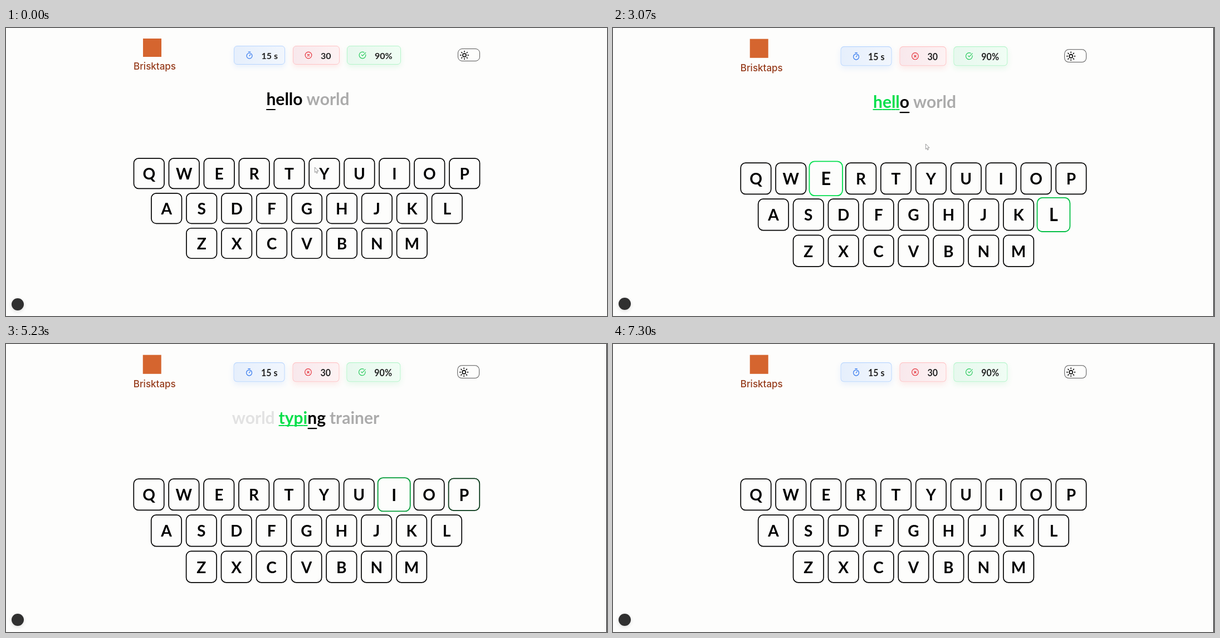
An HTML page that plays this animation: 1079x519 px, repeating every 8 s.

```html
<!DOCTYPE html>
<html lang="en">
<head>
<meta charset="utf-8">
<style>
  html, body { margin: 0; width: 100%; height: 100%; overflow: hidden; background: #fdfdfc; }
  body * { position: absolute; box-sizing: border-box; }
  svg { fill: none; stroke: currentColor; stroke-width: 2; stroke-linecap: round; stroke-linejoin: round; }
  #app { left: 0; top: 0; width: 1079px; height: 440px; transform-origin: 0 0;
         font: 700 16px Lato, sans-serif; font-kerning: none; color: #000; }
  #mark { left: 246px; top: 19px; width: 33px; height: 33px; background: #d5652f; }
  #brand { left: 217px; top: 58px; width: 100px; text-align: center;
           font: 500 17px/22px Inter, sans-serif; color: #963c1c; }
  .badge { top: 31.5px; height: 34px; border: 1px solid; border-radius: 6px; }
  .badge svg { left: 20px; top: 9px; width: 14px; height: 14px; }
  .badge b { left: 49px; top: 0; line-height: 33px; white-space: pre; color: #222; }
  #toggle { left: 811px; top: 37px; width: 40px; height: 22.5px; border: 1px solid #555; border-radius: 8px; }
  #toggle svg { left: 2px; top: 1.5px; width: 18px; height: 18px; }
  #words { left: 0; top: 109px; width: 1077px; display: flex; justify-content: center; gap: 7px;
           font-size: 30px; line-height: 36px; }
  #words * { position: relative; }
  #words i { display: inline-block; font-style: normal; }
  #words .typed { color: #05df4b; }
  #words .typed::after, #words .next::after { content: ""; position: absolute; left: 0; width: 100%;
           top: 31.5px; height: 2px; background: currentColor; }
  #words .next::after { top: 37px; border-radius: 1px; }
  #keyboard { left: 539.5px; top: 233.8px; transform: scale(.562); }
  .key { width: 100px; height: 100px; border: 3px solid #000; border-radius: 17px; background: #fdfdfc;
         font-size: 50px; line-height: 94px; text-align: center; }
  #dot { left: 10px; width: 22px; height: 22px; border-radius: 50%; background: #303030;
         box-shadow: 0 2px 6px #0002; }
  #edge { left: 1078px; top: 0; width: 1px; height: 519px; background: #000; }
  #pointer { left: 0; top: 0; width: 9px; height: 13px; color: #777; stroke-width: .8; fill: #fff; }
</style>
</head>
<body>
<div id="app">
  <div id="mark"></div>
  <div id="brand">Brisktaps</div>
  <div class="badge" style="left:408.5px;width:92.5px;color:#2f76ee;border-color:#b9d6ff;background:linear-gradient(90deg,#e6effc,#f1f6fd);box-shadow:0 4px 10px #3b82f61c">
    <svg viewBox="0 0 24 24"><circle cx="12" cy="14" r="8.5"/><path d="M9 2h6M12 14l3-4"/></svg><b>15 s</b>
  </div>
  <div class="badge" style="left:515px;width:83.5px;color:#e5323b;border-color:#ffc4c6;background:linear-gradient(90deg,#f8e8ec,#fdf2f3);box-shadow:0 4px 10px #ef44441c">
    <svg viewBox="0 0 24 24"><circle cx="12" cy="12" r="10"/><path d="M9 9l6 6M15 9l-6 6"/></svg><b>30</b>
  </div>
  <div class="badge" style="left:612px;width:97px;color:#25c95a;border-color:#b4f5ca;background:linear-gradient(90deg,#e7f8ee,#f0fdf4);box-shadow:0 4px 10px #22c55e1c">
    <svg viewBox="0 0 24 24"><path d="M21.8 10A10 10 0 1 1 17 3.3M9 11l3 3L22 4"/></svg><b>90%</b>
  </div>
  <div id="toggle"><svg viewBox="0 0 24 24"><circle cx="12" cy="12" r="4"/><path d="M12 2v2M12 20v2M2 12h2M20 12h2M5 5l1.4 1.4M17.6 17.6L19 19M5 19l1.4-1.4M17.6 6.4L19 5"/></svg></div>
  <div id="words"></div>
  <div id="keyboard"></div>
</div>
<div id="dot"></div>
<div id="edge"></div>
<svg id="pointer" viewBox="0 0 9 13"><path d="M.8.8v9l2-1.8 1.4 3.3 1.6-.7-1.4-3.2h2.8z"/></svg>
<script>
const LOOP = 8000, RISE = 150, HOLD = 170, PITCH = 112, GAP = 12;
// One time per letter, then the moment the next word takes over.
const script = [
  ["hello", 2770, 2910, 2985, 3055, 3170, 3290],
  ["world", 3610, 3655, 3780, 3890, 3990, 4090],
  ["typing", 4668, 4830, 4990, 5170, 5625, 5690, 5760],
  ["trainer", 5930, 6090, 6250, 6420, 6570, 6740, 6880, 6990],
].map(([word, ...times]) => ({ word, end: times.pop(), times }));

const $ = id => document.getElementById(id);
const clamp = x => Math.min(1, Math.max(0, x));
const easeOut = x => 1 - (1 - clamp(x)) ** 2.3;
const smooth = x => (x = clamp(x), x * x * (3 - 2 * x));

const keys = {};
["QWERTYUIOP", "ASDFGHJKL", "ZXCVBNM"].forEach((row, r) =>
  [...row].forEach((letter, i) => {
    const el = document.createElement("div");
    el.className = "key";
    el.textContent = letter;
    el.style.left = PITCH * (i - row.length / 2) + GAP / 2 + "px";
    el.style.top = PITCH * r + "px";
    $("keyboard").append(el);
    keys[letter] = { el, presses: [] };
  }));
for (const { word, times } of script)
  times.forEach((time, i) => keys[word[i].toUpperCase()].presses.push(time));

let shown;
function drawWords(t) {
  const index = script.filter(s => s.end <= t).length;
  const current = script[index];
  const typed = current ? current.times.filter(time => time <= t).length : 0;
  const state = index + ":" + typed;
  if (state === shown) return;
  shown = state;
  const letters = current ? [...current.word].map((c, i) =>
    `<i class="${i < typed ? "typed" : i === typed ? "next" : ""}">${c}</i>`).join("") : "";
  const side = (i, color) => `<span style="color:${color}">${current && script[i] ? script[i].word : ""}</span>`;
  $("words").innerHTML = side(index - 1, "#e2e2e2") + `<span>${letters}</span>` + side(index + 1, "#ababab");
}

function drawKey({ el, presses }, t) {
  const level = Math.max(0, ...presses.map(p =>
    easeOut((t - p) / RISE) - easeOut((t - p - HOLD) / RISE)));
  el.style.transform = `scale(${1 + .095 * level})`;
  el.style.borderColor = `rgb(${5 * level},${223 * level},${80 * level})`;
  el.style.zIndex = level > 0 ? 1 : 0;
}

function frame(now) {
  const t = now % LOOP;
  const resize = smooth((t - 30) / 150);
  $("app").style.transform = `scale(${1 - .001 * resize},${1 + .035 * resize})`;
  $("dot").style.top = 487 - resize + "px";
  $("edge").style.opacity = resize;
  const move = smooth((t - 30) / 1400);
  $("pointer").style.transform = `translate(${553.5 + 7 * move}px,${250.5 - 42 * move}px)`;
  $("pointer").style.opacity = t < 3500 ? 1 : 0;
  drawWords(t);
  Object.values(keys).forEach(key => drawKey(key, t));
  requestAnimationFrame(frame);
}
frame(performance.now());
</script>
</body>
</html>
```
